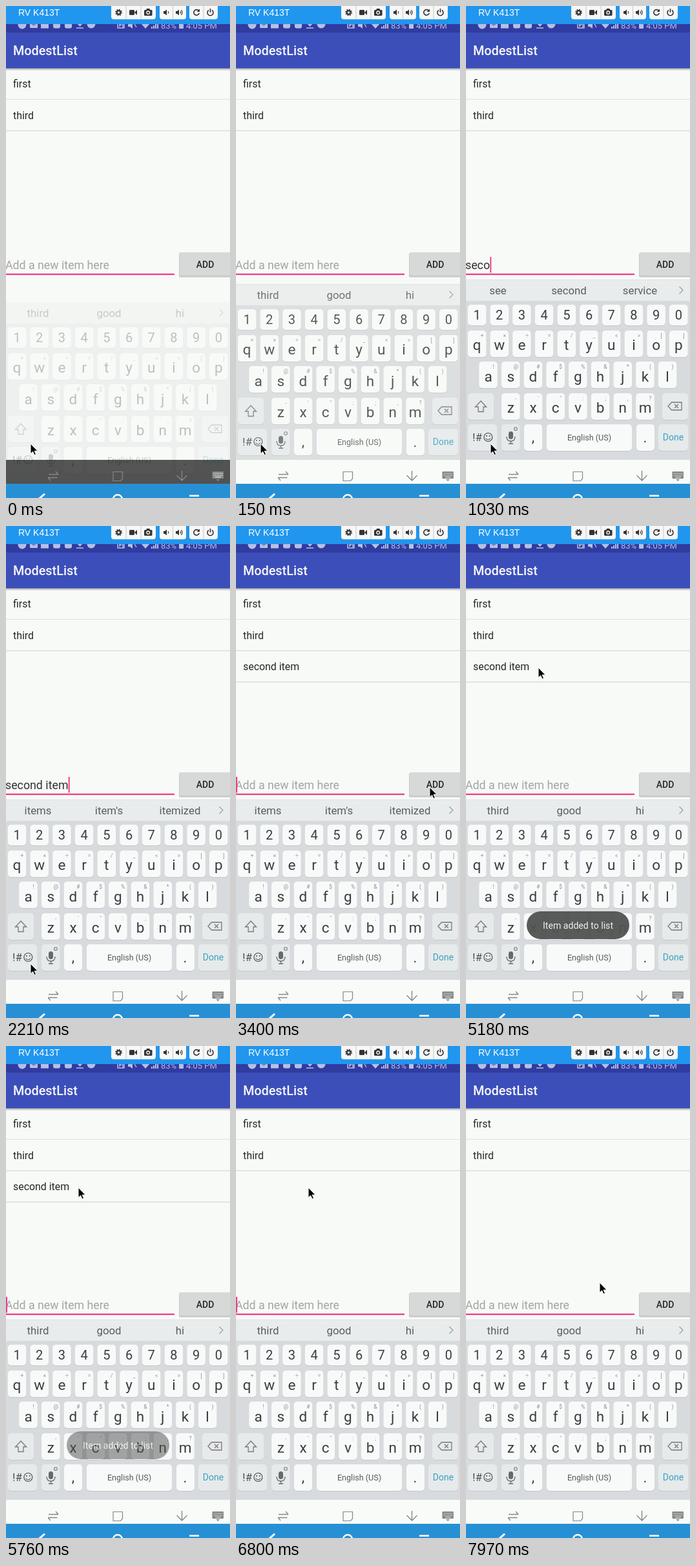
Animation, 347 px wide and 761 px high, one loop 8000 ms. Source, as an HTML page:

```html
<!DOCTYPE html>
<html lang="en">
<head>
<meta charset="utf-8">
<style>
html, body { margin: 0; width: 100%; height: 100%; overflow: hidden; background: #f8faf7; }
svg { display: block; width: 347px; height: 761px; font-family: Roboto, sans-serif; }
text { white-space: pre; }
.line { fill: none; stroke: currentColor; }
</style>
</head>
<body>
<svg id="stage" viewBox="0 0 347 761">
  <defs>
    <linearGradient id="shade" x2="0" y2="1">
      <stop stop-color="#000" stop-opacity=".28"/><stop offset="1" stop-color="#000" stop-opacity="0"/>
    </linearGradient>
    <clipPath id="status"><rect y="28" width="347" height="14"/></clipPath>
    <clipPath id="phone"><rect width="347" height="739"/></clipPath>
  </defs>
  <rect width="347" height="761" fill="#f8faf7"/>
  <g id="list"></g>
  <g id="form"></g>
  <g id="bars"></g>
  <g clip-path="url(#phone)"><g id="keyboard"><g id="keys"></g><g id="words"></g></g></g>
  <g id="nav"></g>
  <g id="toast">
    <rect x="94" y="596" width="159" height="43" rx="21.5" fill="#515352" opacity=".95"/>
    <text x="119" y="623" font-size="14.1" fill="#eee">Item added to list</text>
  </g>
  <path id="mouse" d="M0 0V15.5L3.6 12.2L6 17.6L8.5 16.5L6.1 11.3H11Z" fill="#000" stroke="#fff"/>
</svg>
<script>
const $ = id => document.getElementById(id);
const rect = (x, y, w, h, fill, r = 0) =>
  `<rect x="${x}" y="${y}" width="${w}" height="${h}" rx="${r}" fill="${fill}"/>`;
const text = (x, y, size, fill, str, more = '') =>
  `<text x="${x}" y="${y}" font-size="${size}" fill="${fill}" ${more}>${str.replace(/&/g, '&amp;').replace(/</g, '&lt;')}</text>`;
const line = (d, color, w = 1) => `<path class="line" d="${d}" color="${color}" stroke-width="${w}"/>`;
const fill = (d, color) => `<path d="${d}" fill="${color}"/>`;
const ring = (x, y, r, color, w = 1) =>
  `<circle class="line" cx="${x}" cy="${y}" r="${r}" color="${color}" stroke-width="${w}"/>`;
const dot = (x, y, r, color) => `<circle cx="${x}" cy="${y}" r="${r}" fill="${color}"/>`;
const MID = 'text-anchor="middle"', BOLD = 'font-weight="500"';

function bars() {
  const ink = '#333', pale = '#b9bfe2';
  let s = rect(0, 0, 347, 28, '#2196ee') +
    text(19, 15, 14, '#fff', 'RV K413T', 'font-family="Liberation Sans, sans-serif"');
  for (const [x, w, n] of [[163, 69, 3], [238, 41, 2], [284, 44, 2]]) {
    s += rect(x, -5, w, 25.5, '#f7f7f7', 4);
    for (let i = 1; i < n; i++) s += line(`M${x + w * i / n} 0V20`, '#c4c8cc');
  }
  // settings, video, camera, volume down and up, rotate, power
  s += ring(174.5, 10, 2.8, ink, 2.2) + `<circle class="line" cx="174.5" cy="10" r="4.6" color="${ink}" stroke-width="1.6" stroke-dasharray="1.8 1.81"/>` +
    rect(191, 6, 8, 8, ink, 1.5) + fill('M199 10L203 6V14Z', ink) +
    rect(214, 6, 12.5, 9, ink, 1.5) + rect(217.5, 4, 5.5, 3, ink, 1) + ring(220.2, 10.3, 2.3, '#f7f7f7', 1.3) +
    fill('M244 8H246L249 5.5V14.5L246 12H244Z', ink) + line('M251 8Q252.5 10 251 12', ink) +
    fill('M263 8H265L268 5.5V14.5L265 12H263Z', ink) + line('M270 8Q271.5 10 270 12M271.5 6Q274.5 10 271.5 14', ink, 1.2) +
    line('M298.5 7.2A4.3 4.3 0 1 0 299.3 11', ink, 1.6) + fill('M300 4.5V9H295.5Z', ink) +
    line('M314 6.5A4.5 4.5 0 1 0 319 6.5M316.5 4V10', ink, 1.6);

  s += rect(0, 28, 347, 14, '#303ca0') + '<g clip-path="url(#status)">' +
    dot(25, 29, 6.5, pale) + rect(37, 24, 12, 10, pale, 1) + line('M38 26L43 30L48 26', '#303ca0') +
    rect(54, 23, 12, 11.5, pale) + rect(73, 23, 11, 11.5, pale, 3) + rect(91, 23, 11, 11.5, pale, 3) +
    line('M109 34H120', pale, 1.5) + fill('M110 27H119L114.5 32Z', pale) +
    dot(132, 28, 6.5, pale) +
    line('M173 24V34H183V24M176 24V31L181 26V33', pale, 1.5) +
    fill('M189 27H192L196 23V35L192 32H189Z', pale) + line('M198 26L202 33', pale, 1.3) +
    fill('M209 27Q216 21 223 27L216 35Z', pale);
  for (let i = 0; i < 4; i++) s += rect(225 + i * 3, 32 - i * 2, 2, 3 + i * 2, pale);
  s += text(240, 34.5, 13, pale, '83%') + rect(268, 24, 7, 11, pale, 1) + text(279, 34.5, 13, pale, '4:05 PM') + '</g>';
  return s + rect(0, 41, 347, 55.5, '#3c4eb9') +
    '<rect y="96.5" width="347" height="4" fill="url(#shade)"/>' +
    text(11, 76, 19.8, '#f6f7fb', 'ModestList', BOLD);
}

function keys() {
  const face = '#f8faf9', dim = '#e7eaeb', ink = '#3a3d3f', step = 34.7;
  let s = rect(0, 423, 347, 33, '#e9ecec') + line('M0 423.5H347', '#dfe2e2') +
    rect(0, 456, 347, 246.5, '#d7dbdd') + line('M330.5 434L336 439.5L330.5 445', '#999', 1.1);
  const key = (x, y, w, h, color = face) =>
    rect(x, y + 1, w, h, '#c3c8ca', 5) + rect(x, y, w, h, color, 5);
  const row = (x, y, h, size, base, chars, marks = '') => {
    [...chars].forEach((c, i) => {
      const cx = x + step * i;
      s += key(cx - 14.3, y, 28.6, h) + text(cx, base, size, ink, c, MID);
      if (marks[i]) s += text(cx + 8, y + 11, 8.5, '#8d9193', marks[i], MID);
    });
  };
  row(17, 462, 32, 20, 485, '1234567890');
  row(17, 502, 41, 22.5, 532, 'qwertyuiop', '+×÷=/_<>[]');
  row(34.5, 550, 41, 22.5, 581, 'asdfghjkl', '!@#$%&*()');
  row(69.3, 599, 41, 22.5, 629, 'zxcvbnm', `-'":;,?`);

  s += key(3, 599, 40, 41, dim) + line('M23 611L31.5 620H27V627.5H19V620H14.5Z', '#777', 1.3) +
    key(304, 599, 40, 41, dim) + line('M313 619L318.5 613H334V625H318.5ZM323 616L329 622M329 616L323 622', '#777', 1.3) +
    key(3, 647, 45, 41, dim) + text(10, 673, 17, '#4c4f51', '!#') +
    ring(34.3, 667, 6.5, '#4c4f51', 1.2) + dot(32, 665, 1, '#4c4f51') + dot(36.6, 665, 1, '#4c4f51') +
    line('M30.5 668.5Q34.3 673.5 38 668.5', '#4c4f51', 1.1) +
    key(55, 647, 28.6, 41, dim) + rect(66, 658, 7, 12, '#666a6c', 3.5) +
    line('M63 666Q63 673 69.5 673Q76 673 76 666M69.5 673V677M66 677H73', '#666a6c', 1.3) +
    ring(77, 654, 2.4, '#8d9193', 1.4) +
    key(90, 647, 28, 41) + text(104, 674, 22, ink, ',', MID) +
    key(125, 647, 132, 41) + text(191, 672, 12.6, '#55595b', 'English (US)', MID) +
    key(264, 647, 28, 41) + text(277.5, 675, 22, ink, '.', MID) +
    key(298, 647, 46, 41, dim) + text(321, 672, 14, '#36a3c0', 'Done', MID);
  return s;
}

function nav() {
  const ink = '#858886', blue = '#2790d4';
  let s = '<rect id="navBack" y="702" width="347" height="37"/>' +
    line('M65 729.5H79.5M69 734L65 729.5M66 724.5H81M81 724.5L77 720', ink, 1.3) +
    line('M166 720.5H180.5V731L177.5 734.5H166Z', ink, 1.2) +
    line('M272.5 719V733.5M264.5 726L272.5 734L280.5 726', ink, 1.4) +
    rect(319.5, 720, 17.5, 11, ink, 1) +
    line('M321.5 723H335.5M321.5 726H335.5', '#e8e8e8', 1.2) + line('M324 728.7H333', '#e8e8e8') +
    fill('M325.5 732H331L328.2 735Z', ink);
  for (let x = 323; x < 335; x += 2.6) s += line(`M${x} 722V727`, ink, .8);
  return s + rect(0, 739, 347, 22, blue) +
    line('M60 754.5L51.5 762L60 770', '#fff', 3) + ring(173, 763, 7, '#fff', 2.4) +
    line('M284 757.5H299', '#fff', 2.6);
}

function list(items) {
  return items.map((item, i) =>
    text(11, 126.3 + 48.5 * i, 15.9, '#262828', item) +
    line(`M0 ${144.5 + 48.4 * i}H347`, i == items.length - 1 || i == 1 ? '#d5d8d5' : '#e0e3e0', 1.2)).join('');
}

function form(typed, caret) {
  let s = (typed ? text(-1, 407, 17.8, '#333', typed, 'id="typed"') : text(-1, 407, 17.75, '#a3a5a3', 'Add a new item here')) +
    rect(0, 413.8, 261, 2.3, '#ef3f8a') +
    rect(268, 382, 80, 37.5, '#c6c9c7', 2) + rect(269, 381, 80, 36, '#d6d9d8', 2) +
    text(308.5, 405, 14, '#262828', 'ADD', MID + BOLD);
  $('form').innerHTML = s;
  if (caret) {
    const x = typed ? $('typed').getComputedTextLength() - .8 : 0;
    $('form').insertAdjacentHTML('beforeend', rect(x, 388, 2, 24.5, '#ef3f8a'));
  }
}

// Each entry holds from its step until the next one.
const hold = (table, n) => table.filter(e => e[0] <= n).pop()[1];
const typing = [[0, ''], [4, 's'], [5, 'se'], [6, 'sec'], [7, 'seco'], [8, 'secon'], [9, 'second'],
  [10, 'second '], [11, 'second i'], [12, 'second it'], [14, 'second ite'], [15, 'second item'], [23, '']];
const hints = [[0, 'third good hi'], [5, 'so see some'], [6, 'see second service'], [9, 'second seconds secondary'],
  [11, 'third good hi'], [12, 'it is in'], [14, "items item's itemized"], [24, 'third good hi']];
const path = [[0, 38, 677], [15, 38, 677], [21, 300, 404], [23, 300, 404], [27, 129, 260],
  [31, 112, 219], [49, 112, 219], [54, 207, 366]];

function place(n) {
  const i = Math.max(1, path.findIndex(p => p[0] >= n));
  const [a, x, y] = path[i - 1], [b, u, v] = path[i], k = (n - a) / (b - a);
  return `translate(${x + (u - x) * k} ${y + (v - y) * k})`;
}

const STEP = 147.6, LOOP = 8000;

function draw(n) {
  const t = n * STEP, typed = hold(typing, n);
  $('list').innerHTML = list(['first', 'third', 'second item'].slice(0, n >= 23 && n < 46 ? 3 : 2));
  form(typed, n > 1 && (n < 23 || Math.floor((t - 3300) / 500) % 2 == 0));
  $('words').innerHTML = hold(hints, n).split(' ')
    .map((w, i) => text(49.5 + 110 * i, 445.7, 16.8, '#595d5f', w, MID)).join('');
  const [drop, alpha] = [[35, .3], [7, .85]][n] || [0, 1];
  $('keyboard').setAttribute('transform', `translate(0 ${drop})`);
  $('keyboard').setAttribute('opacity', alpha);
  $('navBack').setAttribute('fill', n ? '#f9fbf8' : 'rgba(0,0,0,.66)');
  $('toast').setAttribute('opacity', n == 24 || n == 39 ? .55 : n > 24 && n < 39 ? 1 : 0);
  $('mouse').setAttribute('transform', place(n));
}

$('bars').innerHTML = bars();
$('keys').innerHTML = keys();
$('nav').innerHTML = nav();

let shown = -1;
const start = performance.now();
function tick() {
  const n = Math.floor(((performance.now() - start) % LOOP + 12) / STEP);
  if (n != shown) draw(shown = n);
  requestAnimationFrame(tick);
}
tick();
</script>
</body>
</html>
```
